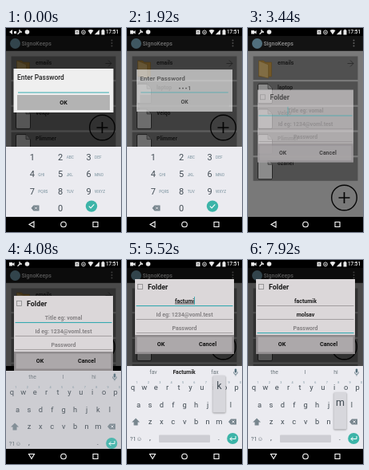
Animation of 144x256 px, one loop 8 s. Source, as an HTML page with a canvas:

```html
<!DOCTYPE html>
<html lang="en">
<head>
<meta charset="utf-8">
<style>
  html, body { margin: 0; width: 100%; height: 100%; overflow: hidden; background: #000; }
  canvas { display: block; }
</style>
</head>
<body>
<canvas id="stage" width="144" height="256"></canvas>
<script>
const c = document.getElementById('stage').getContext('2d');
const LOOP = 8000, STEP = 80;
const TEAL = '#35a9b0', INK = '#414b53', ICON = '#78868e', KEYS = '#ebebf0', ROUND = '#3cb4a8';
const clamp = v => Math.max(0, Math.min(1, v));
const ramp = (t, from, length) => clamp((t - from) / length);

function rect(x, y, w, h, color) {
  c.fillStyle = color;
  c.fillRect(x, y, w, h);
}
function rounded(x, y, w, h, r, color) {
  c.beginPath();
  c.roundRect(x, y, w, h, r);
  c.fillStyle = color;
  c.fill();
}
function disc(x, y, r, color) {
  c.beginPath();
  c.arc(x, y, r, 0, 7);
  c.fillStyle = color;
  c.fill();
}
function ring(x, y, r, color, width) {
  c.beginPath();
  c.arc(x, y, r, 0, 7);
  c.strokeStyle = color;
  c.lineWidth = width;
  c.stroke();
}
function path(d, stroke, fill, width = 1) {
  const p = new Path2D(d);
  if (fill) { c.fillStyle = fill; c.fill(p); }
  if (stroke) { c.strokeStyle = stroke; c.lineWidth = width; c.stroke(p); }
}
function text(s, x, y, size, color, align = 'center', weight = 400) {
  c.font = `${weight} ${size}px Roboto, sans-serif`;
  c.textAlign = align;
  c.textBaseline = 'middle';
  c.fillStyle = color;
  c.fillText(s, x, y + 0.5);
}
function layer(alpha, draw, dy = 0) {
  if (alpha <= 0) return;
  c.save();
  c.globalAlpha = alpha;
  c.translate(0, dy);
  draw();
  c.restore();
}
function scaled(k, cy, draw) {
  c.translate(72, cy);
  c.scale(k, k);
  c.translate(-72, -cy);
  draw();
}

// Status, title and navigation bars
function statusBar(t) {
  rect(0, 0, 144, 10, '#000');
  const w = '#e8e8e8';
  path(t < STEP ? 'M4 5l4 -3v6z M10 4h3v3h-3z' : 'M4 3h4v1.500l2.500 -1.500v4.500l-2.500 -1.500v1.500h-4z', null, w);
  path('M14.500 7.800l4 -4M17 2v3h3', w, null, 1.3);
  disc(26.5, 5, 2.8, w);
  rect(86.5, 2.5, 5, 5.5, w);
  path('M88 4.500h2M88 6.200h2M95.500 5.300h3', '#333', null, 0.7);
  ring(97, 5.3, 2.4, w, 0.9);
  path('M95.700 5.300h2.600', w, null, 0.9);
  path('M102.500 3q3.500 -2 7 0l-3.500 5.200z M117 2v6.200h-6.200z M119.500 2.800h1v-1h2v1h1v5.700h-4z', null, w);
  text('17:51', 141, 5, 6.3, '#fff', 'right', 500);
}
function titleBar() {
  rect(0, 10, 144, 18.8, '#222');
  disc(11.5, 19.5, 6.5, '#8fc4dc');
  text('SignoKeeps', 19.5, 19.3, 7, '#fff', 'left', 500);
  for (const y of [15.5, 19, 22.5]) disc(132.5, y, 1, '#aaa');
}
function navBar(keyboardOpen) {
  rect(0, 237, 144, 19, '#000');
  path(keyboardOpen ? 'M28.500 243.500h7l-3.500 6z' : 'M35 243v7l-6 -3.500z', '#fff', null, 1.1);
  ring(72, 246.5, 3.3, '#fff', 1.1);
  path('M109 243.500h6v6h-6z', '#fff', null, 1.1);
}

function list(bottom) {
  rect(0, 28, 144, 209, '#d5d5d5');
  ['emails', 'laptop', 'Velqo', 'Plimmer', 'ozanel'].forEach((name, i) => {
    const y = 35.5 + i * 31.7;
    rect(6.5, y, 131, 29.5, '#8e8e8e');
    text(name, 37, y + 7.5, 6.8, '#2c2c2c', 'left', 700);
    if (i) {
      path(`M14 ${y + 3}h11l5.500 6v17q0 1.500 -1.500 1.500h-15q-1.500 0 -1.500 -1.500v-21.500q0 -1.500 1.500 -1.500z`, '#333', '#f6f6f6', 0.9);
      path(`M25 ${y + 3}v6h5.500`, '#555', '#ccc', 0.7);
    } else {
      path('M13.500 41h6l2 2h8v18h-16z', '#9c7630', '#c99a45', 0.6);
      path('M13.500 41l12 5v17l-12 -3z', '#a8833c', '#e4c078', 0.6);
      path('M124.500 44.500h7.500M128 40.500l4 4l-4 4', '#444', null, 0.8);
    }
  });
  const y = bottom - 24;
  ring(120.5, y, 15.8, '#0a0a0a', 1.4);
  path(`M113.500 ${y}h14M120.500 ${y - 7}v14`, '#0a0a0a', null, 1.7);
  rect(0, bottom, 144, 237 - bottom, '#000');
}

// Password dialog
const pinTimes = [720, 960, 1200, 1360];
function pinDialog(t) {
  rect(9.5, 51, 125, 55, '#efefef');
  text('Enter Password', 14, 62, 8.4, '#222', 'left', 500);
  rect(15, 80.5, 114, 1, TEAL);
  rect(14, 84, 116, 19, '#b3b3b3');
  text('OK', 72, 93.3, 7.2, '#111', 'center', 700);
  const n = pinTimes.filter(at => t >= at).length;
  for (let i = 0; i < n; i++) {
    const x = 72 + (i - (n - 1) / 2) * 4.2;
    if (i === n - 1) text('1', x, 75.5, 7, '#222', 'center', 500);
    else disc(x, 75.5, 0.95, '#222');
  }
  if (t >= 320 && t < 1760) rect(71.3 + n * 2.2, 71, 0.9, 9, TEAL);
}

function backspace(x, y) {
  path(`M${x - 5} ${y}l3 -3.500h7v7h-7z`, null, ICON);
  path(`M${x - 0.5} ${y - 1.5}l3 3m0 -3l-3 3`, KEYS, null, 0.9);
}
function keypad() {
  rect(0, 149, 144, 88, KEYS);
  const letters = ['', 'ABC', 'DEF', 'GHI', 'JKL', 'MNO', 'PQRS', 'TUV', 'WXYZ'];
  letters.forEach((s, i) => {
    const x = 32.8 + (i % 3) * 35.4, y = 162 + Math.floor(i / 3) * 21.4;
    text(i + 1, x, y, 11, INK);
    text(s, x + 7.5, y + 0.2, 4.8, '#78909c', 'left');
  });
  text('0', 68.2, 226.2, 11, INK);
  backspace(36.5, 226);
  disc(107, 223.6, 7.2, ROUND);
  path('M103.800 223.600l2.300 2.300l4.200 -4.600', '#fff', null, 1.1);
}

// New entry form: presses are [time, key]; the letter lands one step later
const spell = (word, times) => times.map((at, i) => [at, word[i]]);
const titleKeys = spell('factumik', [4560, 4640, 4720, 4880, 4960, 5120, 5280, 5520]);
const idKeys = spell('molsav', [6400, 6640, 6720, 6800, 6880, 6960]);
const presses = [...titleKeys, ...idKeys, [7920, 'm']];
const typed = (keys, t) => keys.filter(k => t >= k[0] + STEP).map(k => k[1]).join('');
const focusTimes = [3260, 6000, 7400];
const hints = ['Title eg: vomal', 'Id eg: 1234@voml.test', 'Password'];

function formDialog(t) {
  rect(10, 24, 124, 94, '#dbd7d9');
  c.strokeStyle = '#888';
  c.lineWidth = 0.8;
  c.strokeRect(13.4, 30.4, 6.2, 6.2);
  text('Folder', 26, 34, 8.9, '#1c1c1c', 'left', 700);
  const focus = t >= 7520 ? 2 : t >= 6000 ? 1 : 0;
  const values = [typed(titleKeys, t), typed(idKeys, t), ''];
  values.forEach((value, i) => {
    const y = 51 + i * 17, active = i === focus;
    text(value || hints[i], 72, y, 7, value ? '#1c1c1c' : '#858284', 'center', 700);
    rect(11.5, y + 6, 121, active ? 1.1 : 0.7, active ? TEAL : '#8a8688');
    if (!active) return;
    const half = c.measureText(value || hints[i]).width / 2;
    if (value) rect(72 - half, y + 3.6, half * 2, 0.7, '#1c1c1c');
    const last = Math.max(focusTimes[i], ...presses.map(k => k[0] + STEP).filter(at => at <= t));
    if ((t - last) % 1000 < 500) rect(72 + (value ? half : -half), y - 5, 0.9, 10, TEAL);
  });
  rect(10, 94, 124, 24, '#8f8b8d');
  rect(12.5, 96.5, 119, 19, '#aca8aa');
  text('OK', 42.5, 105.7, 7.2, '#111', 'center', 700);
  text('Cancel', 101, 105.7, 7.2, '#111', 'center', 700);
}

const rows = ['qwertyuiop', 'asdfghjkl', 'zxcvbnm'];
const rowStart = [7.4, 14.6, 29];
const rowY = [160, 182, 203];
function suggestions(t) {
  const word = t < 6000 ? typed(titleKeys, t) : t < 7520 ? typed(idKeys, t) : '';
  if (!word) return ['the', 'I', 'hi'];
  if (word === 'f') return ['for', 'from', 'find'];
  if (word === 'fa') return ['day', 'far', 'fast'];
  if (word === 'm') return ['I', 'my', 'maybe'];
  if (word[0] === 'f') return ['fav', 'Factumik', 'fax'];
  return ['more', word, 'most'];
}
function keyboard(t) {
  rect(0, 133, 144, 104, KEYS);
  suggestions(t).forEach((s, i) => {
    const bold = s.length > 5;
    text(s, 33 + i * 38.5, 140.7, 6.8, bold ? '#222' : '#6b757b', 'center', bold ? 700 : 400);
  });
  rounded(134.7, 136.5, 2.6, 5, 1.3, '#546e7a');
  path('M133.500 140.500q0 3 2.500 3t2.500 -3M136 143.500v2', '#546e7a', null, 0.8);
  rows.forEach((row, r) => [...row].forEach((key, i) => {
    const x = rowStart[r] + i * 14.4;
    text(key, x, rowY[r], 9.3, INK);
    if (!r) text((i + 1) % 10, x + 5, 153.5, 3.8, '#78909c');
  }));
  path('M11 198.500l5 5h-2.500v4h-5v-4h-2.500z', null, ICON);
  backspace(132, 203);
  text('?1☺', 11.5, 224, 7.5, '#5f6b72');
  text(',', 29, 223, 9, INK);
  rounded(40, 219.5, 64, 9.5, 1, '#cdcdd3');
  text('.', 115, 223, 9, INK);
  disc(132.3, 224, 7.1, ROUND);
  path('M136 221v3.500h-7M131.500 222l-2.500 2.500l2.500 2.500', '#fff', null, 1);

  const press = presses.filter(k => t >= k[0]).pop();
  if (!press || t >= press[0] + 3 * STEP) return;
  const r = rows.findIndex(row => row.includes(press[1]));
  const x = rowStart[r] + rows[r].indexOf(press[1]) * 14.4, y = rowY[r];
  c.save();
  c.shadowColor = '#0006';
  c.shadowBlur = 2;
  c.shadowOffsetY = 0.7;
  rounded(x - 8, y - 37, 16, 46.5, 1.5, '#d7d7dc');
  c.restore();
  text(press[1], x, y - 24.5, 12.5, INK);
}

function scene(t) {
  const padHide = ramp(t, 1920, 240);
  const bottom = t < 2080 ? 149 : t < 4000 ? 237 : 133;
  const pinHide = ramp(t, 1840, 240);
  const formShow = ramp(t, 3280, 240);
  const scrim = t < 2200 ? 1 - ramp(t, 1880, 280) : formShow;
  c.clearRect(0, 0, 144, 256);
  list(bottom);
  titleBar();
  layer(0.65 * scrim, () => rect(0, 10, 144, 227, '#000'));
  layer(1 - pinHide, () => scaled(1 - 0.12 * pinHide, 78.5, () => pinDialog(t)));
  layer(1 - padHide, keypad, 24 * padHide ** 2);
  const rise = 52 * (1 - ramp(t, 3920, 400)) ** 1.78;
  layer(formShow, () => scaled(0.9 + 0.1 * formShow, 71, () => formDialog(t)), rise);
  const slide = ramp(t, 3920, 320);
  layer(Math.min(1, slide * 1.75), () => keyboard(t), 24 * (1 - slide) ** 2);
  statusBar(t);
  navBar(t >= 4000);
}

const start = performance.now();
function tick() {
  const t = (performance.now() - start) % LOOP;
  scene(Math.floor(t / STEP) * STEP);
  requestAnimationFrame(tick);
}
tick();
</script>
</body>
</html>
```
